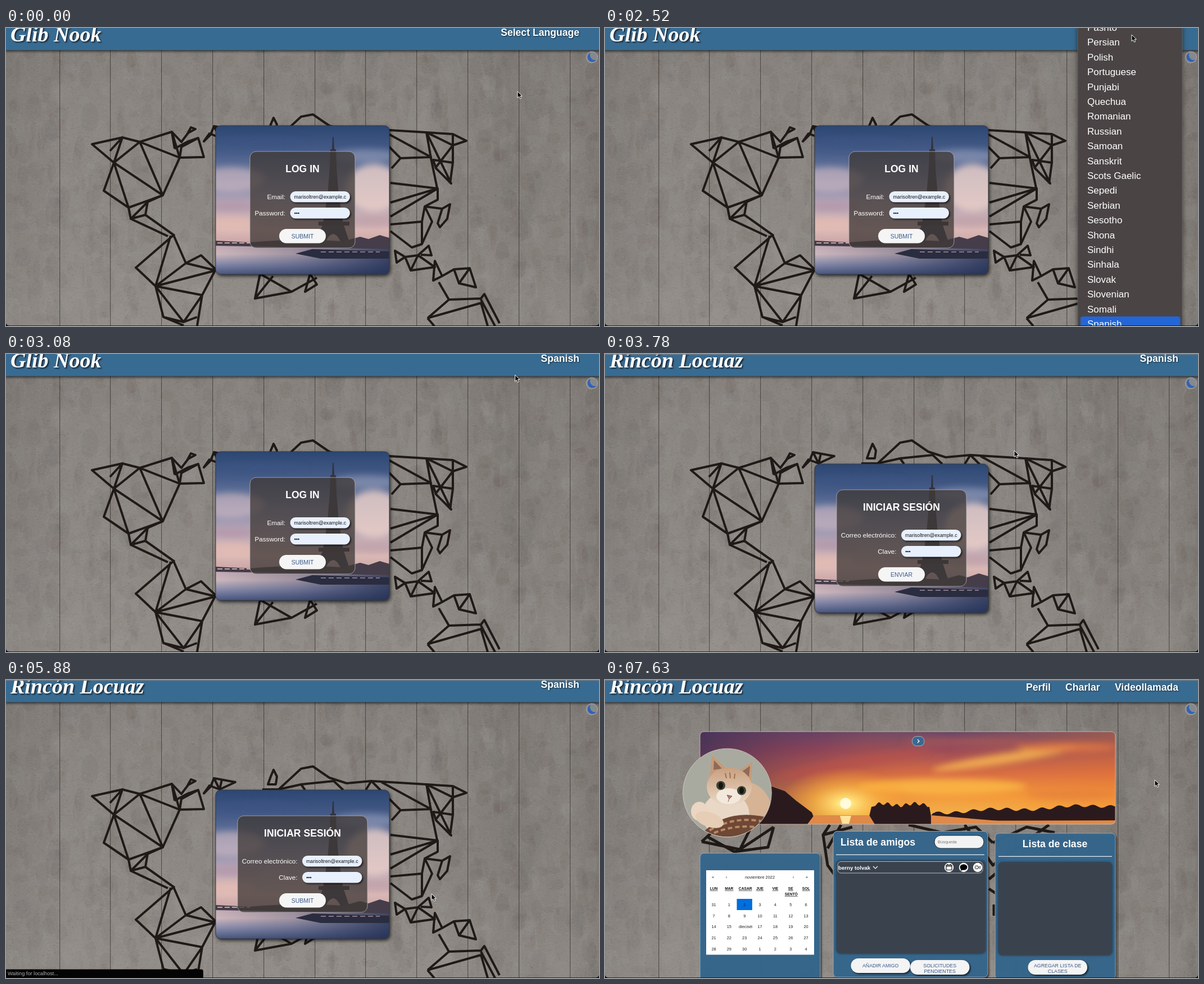
These frames come from a looping animation (1055 px wide and 531 px high, 7700 ms). An HTML page with a canvas:

```html
<!DOCTYPE html>
<html lang="en">
<head>
<meta charset="utf-8">
<title>Language switch demo</title>
<style>
html, body { margin: 0; width: 100%; height: 100%; overflow: hidden; background: #000; }
canvas, svg { position: absolute; left: 0; top: 0; width: 1055px; height: 531px; }
text { font-family: "Liberation Sans", Arial, sans-serif; fill: #fff; white-space: pre; }
.b { font-weight: bold; }
.head { font-weight: bold; font-size: 17.6px; }
.nav { filter: drop-shadow(1px 1.5px 1px #0009); }
.title { font: italic bold 38px "Liberation Serif", "Noto Serif", serif; filter: drop-shadow(2px 2px 1px #1c2530); }
.label { font-size: 11.7px; }
.btn { fill: #3a5a8c; }
.lift { filter: drop-shadow(2px 2.5px 1.5px #000a); }
.panel { fill: #38698f; fill-opacity: .96; stroke: #a9bccb; stroke-width: .8; }
.well { fill: #3a434d; filter: drop-shadow(0 0 2px #1c2733); }
.cal { font-size: 7.4px; fill: #222; }
.day { font-size: 6.7px; font-weight: bold; fill: #111; text-decoration: underline; }
</style>
</head>
<body>
<canvas id="wall" width="1055" height="531"></canvas>
<svg id="stage" viewBox="0 0 1055 531" xmlns="http://www.w3.org/2000/svg"></svg>
<script>
const LOOP = 7700, STEP = 70;
const $ = id => document.getElementById(id);

const rect = (x, y, w, h, r, attrs = '') =>
  `<rect x="${x}" y="${y}" width="${w}" height="${h}" rx="${r}" ${attrs}/>`;
const text = (s, x, y, attrs = '', anchor = 'start') =>
  `<text x="${x}" y="${y}" text-anchor="${anchor}" ${attrs}>${s}</text>`;
const mid = (s, x, y, attrs) => text(s, x, y, attrs, 'middle');
const path = (d, attrs) => `<path d="${d}" ${attrs}/>`;
const oval = (x, y, rx, ry, fill, more = '') =>
  `<ellipse cx="${x}" cy="${y}" rx="${rx}" ry="${ry}" fill="${fill}" ${more}/>`;
const gradient = (id, stops, dir = 'x2="0" y2="1"') =>
  `<linearGradient id="${id}" ${dir}>` +
  stops.map(([o, c]) => `<stop offset="${o}" stop-color="${c}"/>`).join('') + '</linearGradient>';

function paintWall() {
  const c = $('wall').getContext('2d');
  let seed = 7;
  const rnd = () => (seed = (seed * 16807) % 2147483647) / 2147483647;
  const fade = (x, y, stops) => {
    const g = c.createLinearGradient(0, 0, x, y);
    stops.forEach(s => g.addColorStop(...s));
    c.fillStyle = g;
    c.fillRect(0, 0, 1055, 531);
  };
  fade(1055, 0, [[0, '#827d79'], [.12, '#8c8782'], [.7, '#8b8681'], [.85, '#817c77'], [.95, '#86817c'], [1, '#7d7873']]);
  fade(0, 531, [[0, 'rgba(60,56,52,.1)'], [.5, 'rgba(150,146,140,0)'], [1, 'rgba(170,166,160,.22)']]);
  for (let i = 0; i < 1500; i++) {
    c.fillStyle = rnd() < .5 ? 'rgba(60,55,52,.045)' : 'rgba(178,174,168,.05)';
    c.beginPath();
    c.ellipse(rnd() * 1055, rnd() * 531, 2 + rnd() * 14, 3 + rnd() * 24, 0, 0, 7);
    c.fill();
  }
  for (let i = 0; i < 30000; i++) {
    c.fillStyle = rnd() < .5 ? 'rgba(50,46,43,.11)' : 'rgba(190,186,180,.12)';
    c.fillRect(rnd() * 1055 | 0, rnd() * 531 | 0, 1 + rnd() * 2, 1);
  }
  for (let i = 0; i < 11; i++) {
    const x = Math.round(95.5 + i * 90.8);
    c.fillStyle = 'rgba(40,36,34,.5)';
    c.fillRect(x - 1, 38, 1.4, 493);
    c.fillStyle = 'rgba(180,176,170,.14)';
    c.fillRect(x + 1, 38, 1, 493);
  }
}

const land = [
  // the Americas
  'M153 207L207 195L192 240ZM185 219L207 195L238 203L295 185L309 231L279 298L218 320L174 290L192 240L238 203L279 298L192 240L218 320M238 203L309 231',
  'M218 320L222 340L248 333L252 310L222 340L288 371M248 333L300 370M279 298L252 310M295 185L312 203L324 187L337 180L329 177L322 190M309 231L352 230L342 196L312 212ZM342 196L322 203L300 215M295 185L300 215',
  'M298 369L231 427L266 460L320 419ZM293 370L266 460M320 419L347 405L373 430L349 476L340 531M320 419L373 432L266 460L280 515L316 530M349 476L266 460L316 524L349 476M280 515L316 524L340 515',
  // northern islands
  'M352 202L364 190L370 175L408 182L380 195L362 188ZM370 175L380 195L384 178M466 186L471 172L476 160L482 172L480 186Z',
  // Eurasia
  'M456 195L485 195L525 158L546 154L575 174L606 184L650 180L748 186L795 189L819 201L795 209L748 186M485 195L525 186L583 180L600 196M525 186L532 196M640 196L650 180L702 232L686 250M668 182L756 230L702 232',
  'M748 186L756 232L768 290M748 186L792 277L765 250L760 235L795 240L795 189M795 209L765 248M795 240L790 277M684 276L768 286L684 311M768 286L684 336',
  'M768 286L768 306L745 318L758 345L740 385L722 391L684 362M684 350L740 345L745 318M740 345L740 385M776 322L790 314L785 340L772 355L768 348ZM745 318L776 322',
  // southern islands
  'M692 397L710 408L695 418ZM710 408L733 405L720 432ZM720 432L763 426L733 405L752 388L757 405L738 404M763 415L760 450L776 442ZM776 442L797 430L825 428L836 462L806 455L797 430M806 455L825 428M770 453L788 484',
  'M750 517L788 484L845 482L851 474L878 526M750 517L762 531M750 517L845 490L857 531M845 484L870 531',
  // Africa
  'M452 438L443 482L508 470L553 445M452 438L508 470M443 482L475 442M532 470L541 438L553 457Z'
];
const scrolledLand = 'M172 288L205 258M172 288L240 302L300 262M240 302L262 258M180 278L230 306L290 298L300 262M400 258L388 276L396 330L412 352M388 276L440 262M420 258L396 300M540 258L600 272L660 262L690 290M640 258L690 330L790 258M690 290L750 262L800 272M683 355L695 345M683 372L695 380M692 400L692 420';

const strokeLand = (d, w) =>
  path(d, `fill="none" stroke="#1f1a17" stroke-width="${w}" stroke-linejoin="round"`);

const defs = `<defs>
  ${gradient('dusk', [[0, '#2c4672'], [.2, '#4b608c'], [.38, '#8189ab'], [.52, '#b5a5b6'], [.7, '#dcbab6'], [.8, '#c8a3a6'], [1, '#a08a9c']])}
  ${gradient('river', [[0, '#c3abb4'], [.3, '#cdb7bd'], [.6, '#8f90ad'], [1, '#46557f']])}
  ${gradient('riverShade', [[0, '#1f2c5000'], [.45, '#1f2c5040'], [1, '#1f2c50d0']], 'x2="1" y2="0"')}
  ${gradient('sunset', [[0, '#66476a'], [.2, '#9b4b58'], [.45, '#d56a45'], [.7, '#f39a3d'], [.9, '#f2b24a'], [1, '#a34a2c']])}
  ${gradient('side', [[0, '#3d2f55cc'], [.3, '#6a355544'], [.6, '#ff9a3000'], [1, '#f0802a55']], 'x2="1" y2="0"')}
  ${gradient('fur', [[0, '#c9a080'], [1, '#ead9c6']])}
  <radialGradient id="glow"><stop stop-color="#fffbe0"/><stop offset=".12" stop-color="#ffe27a"/><stop offset=".5" stop-color="#ffb840" stop-opacity=".6"/><stop offset="1" stop-color="#ff9a30" stop-opacity="0"/></radialGradient>
  <filter id="soft"><feGaussianBlur stdDeviation="6"/></filter>
  <clipPath id="cardClip">${rect(373, 174, 309, 265, 9)}</clipPath>
  <clipPath id="bannerClip">${rect(169, 92, 739, 165, 7)}</clipPath>
  <clipPath id="faceClip"><circle cx="217.5" cy="201" r="78.5"/></clipPath>
  <clipPath id="mailClip">${rect(512, 291, 93, 20, 0)}</clipPath>
  <clipPath id="cellClip">${rect(237, 430, 25, 20, 0)}</clipPath>
</defs>`;

const header = rect(-5, -5, 1065, 44.5, 0, 'fill="#386b91" style="filter:drop-shadow(0 2px 2px #000a)"') +
  text('', 8, 24, 'id="title" class="title"') +
  rect(0, 0, 1055, 1.3, 0, 'id="topEdge" fill="#737b82"');
const moon = '<circle cx="1042.5" cy="52" r="10" fill="#85898e" stroke="#aaa9a8"/>' +
  path('M1040 44A8.5 8.5 0 1 0 1050 57A9 9 0 0 1 1040 44Z', 'fill="#2f62b5"');

const duskPhoto = `<g clip-path="url(#cardClip)">
  ${rect(373, 174, 309, 265, 0, 'fill="url(#dusk)"')}
  <g filter="url(#soft)">
    ${oval(400, 270, 60, 22, '#d6bcc4', 'opacity=".6"')}${oval(655, 285, 50, 42, '#ecd0c8', 'opacity=".8"')}
    ${oval(455, 205, 80, 9, '#3e5584', 'opacity=".7"')}${oval(640, 228, 60, 12, '#98a0bc', 'opacity=".6"')}
    ${oval(405, 318, 45, 9, '#b394a8', 'opacity=".7"')}${oval(655, 345, 50, 10, '#b99aa6', 'opacity=".6"')}
    ${oval(400, 348, 45, 12, '#e5bcb3', 'opacity=".7"')}
  </g>
  ${path('M581 194h2l1 22h3l1 32 4 50 8 50 11 34h-15q-14-30-28 0h-15l11-34 8-50 4-50 1-32h3Z', 'fill="#34323f"')}
  ${rect(571, 305, 23, 5, 0, 'fill="#2f2d3a"')}${rect(556, 345, 55, 7, 0, 'fill="#2f2d3a"')}
  ${rect(373, 387, 309, 52, 0, 'fill="url(#river)"')}${rect(373, 387, 309, 52, 0, 'fill="url(#riverShade)"')}
  ${path('M373 379L434 382Q520 374 600 380L630 372L645 376L665 369L682 374V394L540 391L373 388Z', 'fill="#453d49"')}
  ${path('M376 383H434', 'stroke="#c5a6a6" stroke-width="2" stroke-dasharray="9 4"')}
  ${path('M515 402L545 394L682 398V411H560Z', 'fill="#2a2c40"')}
  ${path('M560 399H665', 'stroke="#a58f95" stroke-width="1.4" stroke-dasharray="9 5"')}
</g>`;

const field = (id, y) => rect(505.5, y, 106.5, 19.5, 9.7, `id="${id}" class="lift" fill="#e8f0fe"`);
const login = `<g id="login">
  ${land.map(d => strokeLand(d, 4)).join('')}
  <g id="card">
    ${rect(373, 174, 309, 265, 9, 'fill="#39415c" style="filter:drop-shadow(2px 3px 3px #000b)"')}
    ${duskPhoto}
    ${rect(373, 174, 309, 265, 9, 'fill="none" stroke="#37383f"')}
    <rect id="glass" y="220" height="172" rx="11" fill="#403a37" fill-opacity=".77" stroke="#b5afb5" stroke-width=".8"/>
    ${mid('', 527.5, 257, 'id="heading" class="head"')}
    <g id="fields">
      ${text('', 497, 305, 'id="mail" class="label"', 'end')}
      ${text('', 497, 334, 'id="pass" class="label"', 'end')}
      ${field('mailBox', 291)}${field('passBox', 320)}
      <g clip-path="url(#mailClip)">${text('marisoltren@example.com', 512.5, 303.5, 'style="fill:#111;font-size:8.8px"')}</g>
      ${[514.3, 517.4, 520.5].map(x => `<circle cx="${x}" cy="330" r="1.25" fill="#111"/>`).join('')}
    </g>
    ${rect(486, 358, 83, 25.5, 12.7, 'fill="#f5f5f5"')}
    ${mid('', 527.5, 374.5, 'id="submit" class="btn" font-size="10.5"')}
  </g>
  ${text('', 1020, 14, 'id="choice" class="head nav"', 'end')}
</g>`;

const trees = () => {
  let d = 'M169 200L200 175L297 190L320 198L340 215L368 236L372 246L430 247L470 243L474 226';
  for (let x = 478; x < 580; x += 3) d += `L${x} ${222 + 3 * Math.sin(x * 1.7) + 2 * Math.sin(x / 9)}`;
  d += 'L580 242';
  for (let x = 583; x <= 910; x += 3) d += `L${x} ${236 - (x - 583) * .04 + 2.5 * Math.sin(x * 2.3) + 2 * Math.sin(x / 23)}`;
  return d + 'V250L600 251L580 257H169Z';
};
const banner = `<g clip-path="url(#bannerClip)">
  ${rect(169, 92, 739, 165, 0, 'fill="url(#sunset)"')}${rect(169, 92, 739, 165, 0, 'fill="url(#side)"')}
  <g filter="url(#soft)">
    ${oval(710, 140, 130, 9, '#ffc052', 'opacity=".75" transform="rotate(-9 710 140)"')}
    ${oval(600, 190, 150, 14, '#ffbf45', 'opacity=".75"')}${oval(820, 120, 90, 8, '#e17a45', 'opacity=".8"')}
    ${oval(440, 150, 140, 10, '#b7504c', 'opacity=".6" transform="rotate(-10 440 150)"')}
    ${oval(640, 110, 110, 7, '#b05a55', 'opacity=".6"')}${oval(830, 205, 80, 9, '#e27a3c', 'opacity=".6"')}
  </g>
  ${oval(428, 220, 120, 65, 'url(#glow)')}
  <circle cx="428" cy="220" r="10" fill="#fffbdc"/>
  ${path(trees(), 'fill="#2b1a1d"')}
  ${path('M360 257L372 241H470L480 257ZM580 241L700 251H908V257H580Z', 'fill="#e08a48"')}
  ${path('M418 242h20l-4 14h-12Z', 'fill="#ffe49a"')}
</g>
${rect(169, 92, 739, 165, 7, 'fill="none" stroke="#d5b8a8" stroke-width=".9"')}
${rect(546.5, 100.5, 21.5, 17, 8, 'fill="#3a6990" stroke="#a9bccb" stroke-width=".9"')}
${path('M556 106l3 3-3 3', 'fill="none" stroke="#fff" stroke-width="1.3"')}`;

const avatar = `<g clip-path="url(#faceClip)">
  ${rect(138, 120, 160, 162, 0, 'fill="#a9aa9f"')}
  ${oval(250, 240, 48, 58, '#d5b394')}${oval(215, 240, 42, 40, '#e9d8c6')}
  ${path('M186 178L190 134L216 158L240 160L262 146L259 190Z', 'fill="#c79a78"')}
  ${path('M193 160L194 143L208 158ZM244 163L258 153L256 173Z', 'fill="#8e6a59"')}
  ${oval(221, 190, 40, 34, 'url(#fur)')}${oval(220, 207, 22, 14, '#f2e8dc')}
  ${oval(206, 188, 8, 8, '#3d4437')}${oval(243, 197, 8, 8, '#3d4437')}
  ${oval(206, 188, 4, 6, '#15130f')}${oval(243, 197, 4, 6, '#15130f')}
  ${path('M217 205l9 2-5 5ZM221 211l-2 6', 'fill="#b07c70" stroke="#8a5c50"')}
  ${path('M222 165l1 10M214 166l2 9M231 167l-1 9', 'stroke="#9c7051" stroke-width="2"')}
  ${path('M178 268Q220 230 284 244L280 285H170Z', 'fill="#6e4835"')}
  ${path('M186 268Q230 242 280 252M182 278Q230 254 280 264', 'fill="none" stroke="#b88967" stroke-width="4" stroke-dasharray="8 5"')}
  ${oval(168, 234, 15, 17, '#ead6c2')}${oval(186, 249, 26, 13, '#e6cdb5', 'transform="rotate(18 186 249)"')}
</g><circle cx="217.5" cy="201" r="78.8" fill="none" stroke="#d9d4cc" stroke-width=".9"/>`;

const pill = (x, y, lines) => rect(x, y, 105.5, 26, 13, 'class="lift" fill="#f4f4f4"') +
  lines.map((s, i) => mid(s, x + 52.7, y + (lines.length > 1 ? 13 + i * 10 : 16), 'class="btn" font-size="8.8"')).join('');

const calendar = () => {
  const colX = i => 193.5 + i * 27.35;
  let out = rect(180, 339, 192, 150.5, 0, 'fill="#fff"') + rect(234.5, 390, 27.4, 20, 0, 'fill="#006edc"');
  [['«', 192], ['‹', 216], ['noviembre 2022', 275.5], ['›', 335], ['»', 359]]
    .forEach(([s, x]) => out += mid(s, x, 354, 'class="cal"'));
  ['LUN', 'MAR', 'CASAR', 'JUE', 'VIE', 'SE', 'SOL'].forEach((s, i) =>
    out += mid(s, colX(i) + (i === 2 ? 1.5 : 0), 374, 'class="day"'));
  out += mid('SENTÓ', colX(5) + 1, 384, 'class="day"');
  for (let i = 0; i < 35; i++) {
    const day = i ? (i - 1) % 30 + 1 : 31, y = 402.8 + Math.floor(i / 7) * 19.8;
    out += day === 16 ? `<g clip-path="url(#cellClip)">${text('dieciséis', 238, y, 'class="cal"')}</g>`
      : mid(day, colX(i % 7), y, 'class="cal"');
  }
  return out;
};

const icons = [612, 638, 663].map(x => `<circle cx="${x}" cy="334" r="8.2" fill="#fff"/>`).join('') +
  rect(607, 329.5, 10, 9, 1, 'fill="none" stroke="#111" stroke-width="1.2"') +
  path('M607 331.5h10M609.5 328v2M614.5 328v2', 'stroke="#111" stroke-width="1.6"') +
  oval(638, 333.5, 6.5, 5.3, '#000') + path('M633 336l0 4 4-2Z', 'fill="#000"') +
  rect(658.5, 331.3, 5.5, 5, 1, 'fill="none" stroke="#222"') + path('M664.5 333.5l3-1.7v4.2l-3-1.7Z', 'fill="none" stroke="#222" stroke-width=".8"');

const panel = (x, y, w) => rect(x, y, w, 260, 7, 'class="panel lift"');
const profile = `<g id="profile">
  ${strokeLand(scrolledLand, 5)}
  ${banner}${avatar}
  ${panel(169, 308.5, 214)}${panel(406, 269.5, 275)}${panel(694, 273, 214)}
  ${calendar()}
  ${text('Lista de amigos', 419, 294.5, 'class="head"')}
  ${rect(586, 277, 88, 23, 11.5, 'fill="#f3f3f3" stroke="#222b33"')}
  ${text('Búsqueda', 592, 291, 'style="fill:#777;font-size:7.5px"')}
  ${mid('Lista de clase', 800.5, 298, 'class="head"')}
  ${path('M411 311.3H675M700 314.3H902', 'stroke="#e4ebf0" stroke-width="1.3"')}
  ${rect(412, 322, 264.5, 165, 7, 'class="well"')}${rect(700, 325, 202, 165, 7, 'class="well"')}
  ${rect(414, 323.5, 258, 20.5, 6, 'fill="none" stroke="#c4c8cc" stroke-width=".9"')}
  ${text('berny tolvak', 415, 337.5, 'class="b" font-size="9.7"')}
  ${path('M477 332l4 4 4-4', 'fill="none" stroke="#fff" stroke-width="1.2"')}
  ${icons}
  ${pill(437.5, 496, ['AÑADIR AMIGO'])}
  ${pill(543, 499, ['SOLICITUDES', 'PENDIENTES'])}
  ${pill(752.5, 499, ['AGREGAR LISTA DE', 'CLASES'])}
  ${text('Perfil', 749, 19, 'class="head nav"')}${text('Charlar', 819, 19, 'class="head nav"')}
  ${text('Videollamada', 1020, 19, 'class="head nav"', 'end')}
</g>`;

const ROW = 26.4;
const firstRows = 'Select Language,Afrikaans,Albanian,Amharic,Arabic,Armenian,Assamese,Aymara,Azerbaijani,Bambara,Basque,Belarusian,Bengali,Bhojpuri,Bosnian,Bulgarian,Catalan,Cebuano,Chichewa,Chinese (Simplified)'.split(',');
const lastRows = 'Pashto,Persian,Polish,Portuguese,Punjabi,Quechua,Romanian,Russian,Samoan,Sanskrit,Scots Gaelic,Sepedi,Serbian,Sesotho,Shona,Sindhi,Sinhala,Slovak,Slovenian,Somali,Spanish'.split(',');
const menuRows = (id, rows, top, active) => `<g id="${id}">` +
  rect(846, top + active * ROW - 13, 177.5, ROW, 4, 'fill="#2366d6"') +
  rows.map((s, i) => text(s, 858, top + i * ROW + 6, 'font-size="17"')).join('') + '</g>';
const menu = `<g id="menu">
  ${rect(841, -8, 186, 560, 6, 'fill="#4a4445" stroke="#6a6465" stroke-width=".8" style="filter:drop-shadow(0 3px 5px #0008)"')}
  ${menuRows('menuTop', firstRows, 11, 0)}
  ${menuRows('menuEnd', lastRows, -1, 20)}
  ${path('M848 12l2 3 4-7', 'id="tick" fill="none" stroke="#fff" stroke-width="1.5"')}
</g>`;

const status = `<g id="status">${path('M0 515.5H347Q351 515.5 351 519V531H0Z', 'fill="#040404"')}
  ${text('Waiting for localhost...', 3, 526, 'style="fill:#b0b0b0;font-size:9.2px"')}</g>`;
const frame = path('M0 525Q0 530 6 530.3H1049Q1055 530 1055 525V531H0Z', 'fill="#0a0a0a"');
const pointer = path('M0 0V11.5L2.7 9L4.6 13.2L6.7 12.2L4.9 8.2H8.4Z',
  'id="pointer" fill="#000" stroke="#fff" stroke-width="1" stroke-linejoin="round"');

paintWall();
$('stage').innerHTML = defs + header + moon + login + profile + menu + status + frame + pointer;

const words = {
  en: { title: 'Glib Nook', heading: 'LOG IN', mail: 'Email:', pass: 'Password:' },
  es: { title: 'Rincón Locuaz', heading: 'INICIAR SESIÓN', mail: 'Correo electrónico:', pass: 'Clave:' }
};
// time, x, y of the pointer tip
const route = [
  [0, 910, 113], [140, 912, 105], [350, 926, 55], [560, 937, 12], [2940, 937, 12],
  [3150, 890, 50], [3430, 780, 140], [3640, 728, 172], [3780, 728, 172],
  [4060, 700, 320], [4340, 625, 440], [4550, 570, 420], [4760, 540, 392], [5110, 540, 392],
  [5390, 742, 382], [5530, 757, 381], [6510, 757, 381],
  [6860, 880, 260], [7210, 1003, 195], [7490, 1003, 195], [7630, 978, 178], [LOOP, 978, 178]
];
const clamp = v => Math.max(0, Math.min(1, v));
const show = (id, alpha) => {
  $(id).style.display = alpha > 0 ? '' : 'none';
  $(id).style.opacity = alpha;
};
const move = (id, x, y) => $(id).setAttribute('transform', `translate(${x} ${y})`);
const within = (t, a, b) => +(t >= a && t < b);

function render(t) {
  const spanish = t >= 3220, home = t >= 6090;
  Object.entries(words[spanish ? 'es' : 'en']).forEach(([id, s]) => $(id).textContent = s);
  $('choice').textContent = t < 2940 ? 'Select Language' : 'Spanish';
  $('submit').textContent = spanish && t < 5460 ? 'ENVIAR' : 'SUBMIT';
  $('glass').setAttribute('x', spanish ? 412 : 434);
  $('glass').setAttribute('width', spanish ? 231 : 187);
  move('card', 0, spanish ? 22 : 0);
  move('fields', spanish ? 21.5 : 0, 0);
  show('topEdge', +spanish);
  show('login', +!home);
  show('profile', +home);

  show('menu', within(t, 700, 2940) * clamp((2940 - t) / 350));
  show('menuTop', +(t < 1470));
  show('tick', +(t < 1470));
  show('menuEnd', +(t >= 1470));
  show('status', within(t, 5040, 6300) * clamp((6300 - t) / 210));

  const i = route.findIndex(p => p[0] > t), [t0, x0, y0] = route[i - 1], [t1, x1, y1] = route[i];
  const k = (t - t0) / (t1 - t0);
  move('pointer', x0 + (x1 - x0) * k, y0 + (y1 - y0) * k);
}

const start = performance.now();
let last = -1;
function tick() {
  const t = Math.floor((performance.now() - start) % LOOP / STEP) * STEP;
  if (t !== last) render(last = t);
  requestAnimationFrame(tick);
}
tick();
</script>
</body>
</html>
```
